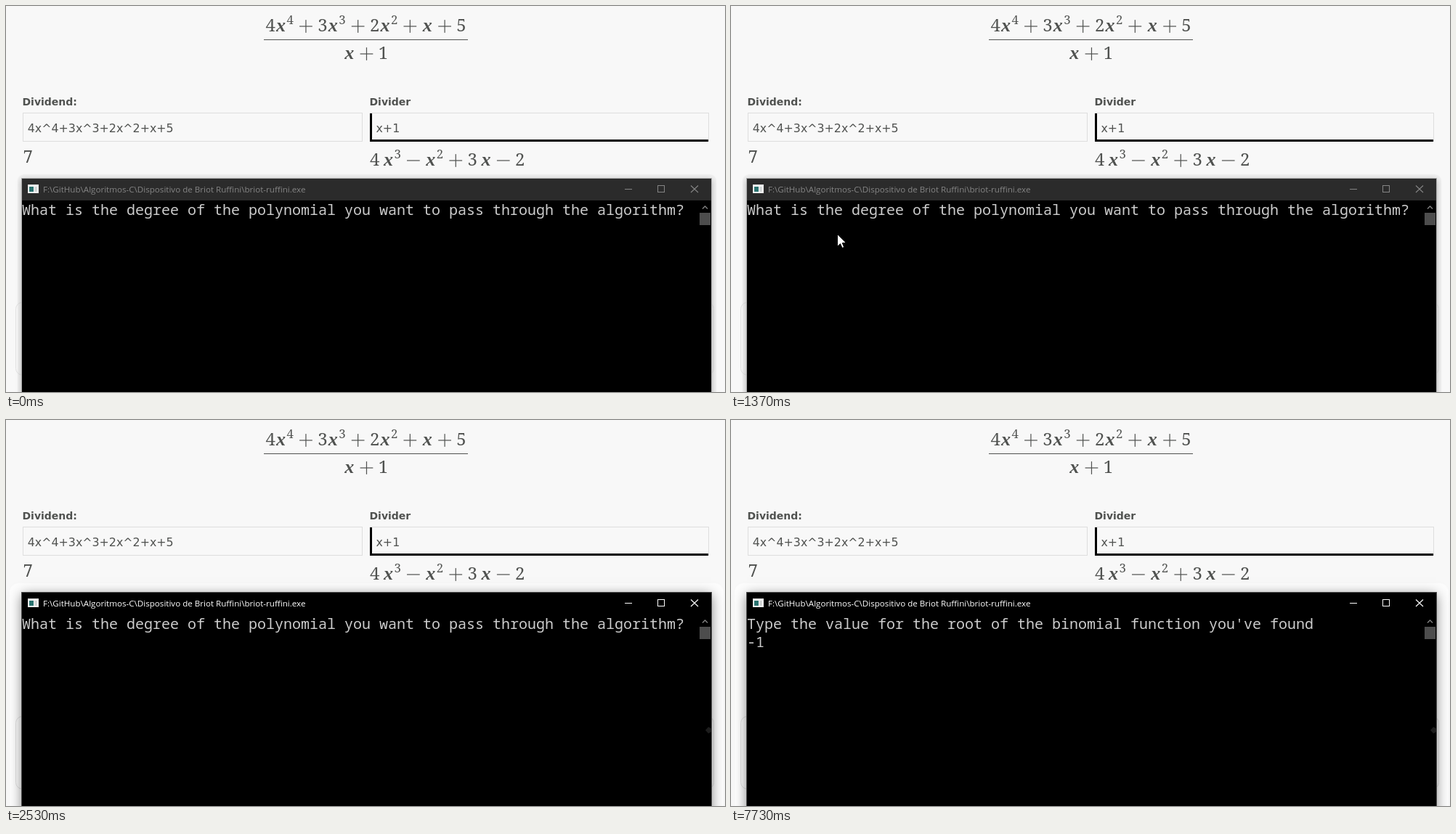
Animation, 990 px wide and 532 px high, one loop 8000 ms. Source, as an HTML page with a canvas:

```html
<!DOCTYPE html>
<html lang="en">
<head>
<meta charset="utf-8">
<title>Polynomial division</title>
<style>
  html, body { margin: 0; width: 100%; height: 100%; overflow: hidden; background: #f8f8f8; }
  canvas { display: block; width: 990px; height: 532px; }
</style>
</head>
<body>
<canvas id="stage" width="990" height="532"></canvas>
<script>
const ctx = document.getElementById('stage').getContext('2d');
const LOOP = 8000;
const INK = '#505250';
const EM = 26.62;
const FOCUS_AT = 1470;
const GONE_AT = 2150;

const ASK_DEGREE = 'What is the degree of the polynomial you want to pass through the algorithm?';
const ASK_ROOT = "Type the value for the root of the binomial function you've found";
const PATH = 'F:\\GitHub\\Algoritmos-C\\Dispositivo de Briot Ruffini\\briot-ruffini.exe';

// start time, prompt, typed text, caret shown
const STATES = [
  [0, ASK_DEGREE, '', false],
  [2020, ASK_DEGREE, '', true],
  [2530, ASK_DEGREE, '', false],
  [3040, ASK_DEGREE, '', true],
  [3560, ASK_DEGREE, '4', true],
  [3590, ASK_DEGREE, '4', false],
  [4080, ASK_DEGREE, '4', true],
  [4180, '', '', false],
  [4210, ASK_ROOT, '', true],
  [5110, ASK_ROOT, '', false],
  [5630, ASK_ROOT, '', true],
  [6140, ASK_ROOT, '', false],
  [6660, ASK_ROOT, '', true],
  [7120, ASK_ROOT, '-', true],
  [7200, ASK_ROOT, '-', false],
  [7400, ASK_ROOT, '-1', true],
  [7730, ASK_ROOT, '-1', false]
];

// time, x, y of the pointer tip
const POINTER = [
  [340, 846, 530], [650, 604, 464], [960, 327, 390], [1140, 222, 356], [1370, 147, 315],
  [1700, 147, 315], [1870, 417, 356], [2150, 976, 422]
];

function rect(x, y, w, h, color) {
  ctx.fillStyle = color;
  ctx.fillRect(x, y, w, h);
}

function text(str, x, y, font, color) {
  ctx.font = font;
  ctx.fillStyle = color;
  ctx.fillText(str, x, y);
}

function line(points, color, width = 1) {
  ctx.beginPath();
  points.forEach(([x, y]) => ctx.lineTo(x, y));
  ctx.strokeStyle = color;
  ctx.lineWidth = width;
  ctx.stroke();
}

function rounded(x, y, w, h, r) {
  ctx.beginPath();
  ctx.roundRect(x, y, w, h, r);
}

// Sets a formula: "^" raises the next digit, "~" is a thin space.
function formula(src, x, base) {
  const digit = (c, x, y, size) => text(c, x, y, size * 0.9 + 'px "Noto Serif", serif', INK);
  for (let i = 0; i < src.length; i++) {
    const c = src[i];
    if (c === '~') {
      x += EM / 6;
    } else if (c === '^') {
      digit(src[++i], x + 0.5, base - 0.36 * EM, 0.7 * EM);
      x += 0.4 * EM;
    } else if (c === '+' || c === '-') {
      const mid = x + 0.611 * EM, axis = Math.round(base - 0.25 * EM), arm = 0.333 * EM;
      rect(mid - arm, axis - 0.6, arm * 2, 1.2, INK);
      if (c === '+') rect(mid - 0.6, axis - arm, 1.2, arm * 2, INK);
      x += 1.2222 * EM;
    } else if (c === 'x') {
      text('x', x + 1.2, base, 'italic bold ' + 0.98 * EM + 'px "Liberation Serif", serif', INK);
      x += 0.5715 * EM;
    } else {
      digit(c, x, base, EM);
      x += 0.5 * EM;
    }
  }
}

function field(x, w, value, focused) {
  ctx.strokeStyle = '#dedede';
  ctx.lineWidth = 1;
  ctx.strokeRect(x + 0.5, 147.5, w - 1, 39);
  if (focused) {
    rect(x, 148, 3, 39, '#000');
    rect(x, 184, w - 1, 3, '#000');
  }
  text(value, x + (focused ? 8.5 : 6.8), 174, '15.84px "DejaVu Sans", sans-serif', INK);
}

function page() {
  rect(0, 0, 990, 532, '#f8f8f8');
  formula('4x^4+3x^3+2x^2+x+5', 357.5, 35);
  rect(355, 46, 281, 1, INK);
  formula('x+1', 465, 73);
  const label = 'bold 14px "DejaVu Sans", sans-serif';
  text('Dividend:', 22.5, 137, label, INK);
  text('Divider', 500.5, 137, label, INK);
  field(23, 468, '4x^4+3x^3+2x^2+x+5', false);
  field(501, 467, 'x+1', true);
  formula('7', 23.5, 216);
  formula('4~x^3-x^2+3~x-2', 501, 220);
}

function shadow(active) {
  if (active) {
    rounded(5, 225, 983, 330, 12);
    ctx.fillStyle = '#fdfdfd';
    ctx.fill();
  } else {
    rounded(16, 232, 962, 330, 9);
    ctx.fillStyle = '#f0f0f0';
    ctx.fill();
  }
  rounded(13.5, 408.5, 961, 100, 9);
  ctx.strokeStyle = '#e2e2e2';
  ctx.lineWidth = 1;
  ctx.stroke();
  ctx.save();
  ctx.shadowColor = active ? 'rgba(0,0,0,.5)' : 'rgba(0,0,0,.32)';
  ctx.shadowBlur = active ? 16 : 8;
  ctx.shadowOffsetY = active ? 3 : 2;
  rect(22, 238, 949, 320, '#000');
  ctx.restore();
}

function titleBar(active) {
  const fg = active ? '#fff' : '#858585';
  ctx.strokeStyle = active ? '#4a4a4a' : '#aaa';
  ctx.lineWidth = 1;
  ctx.strokeRect(21.5, 237.5, 950, 320);
  rect(22, 238, 949, 30, active ? '#000' : '#2b2b2b');

  rect(30, 246, 15, 12, '#e6e6e6');
  rect(31, 248, 13, 9, '#fafafa');
  rect(32, 249, 6, 7, '#2b7370');
  rect(39, 249, 4, 7, '#d5d8d8');

  text(PATH, 51, 257, '11.6px "Open Sans", sans-serif', fg);
  rect(852, 252, 10, 1, fg);
  ctx.strokeStyle = fg;
  ctx.strokeRect(897.5, 247.5, 9, 9);
  line([[943, 247.5], [953, 257]], fg, 1.1);
  line([[953, 247.5], [943, 257]], fg, 1.1);
}

function consoleBody(t) {
  const [, prompt, typed, caret] = STATES.findLast(s => s[0] <= t);
  const mono = '20px "Noto Sans Mono", monospace';
  text(prompt, 22, 288, mono, '#ccc');
  text(typed, 22, 313, mono, '#ccc');
  if (caret) rect(22 + 12 * typed.length, 312, 12, 6, '#fff');
  line([[959, 279.5], [962.5, 276], [966, 279.5]], '#858585', 1.3);
  rect(955, 285, 15, 17, '#4d4d4d');
  if (t >= GONE_AT) {
    ctx.beginPath();
    [[963, 427.5], [967, 423], [971, 425], [971, 430], [967, 432]].forEach(p => ctx.lineTo(...p));
    ctx.fillStyle = '#1d1d1d';
    ctx.fill();
  }
}

function slope(i, k) {
  const a = POINTER[Math.max(i - 1, 0)], b = POINTER[Math.min(i + 1, POINTER.length - 1)];
  const resting = POINTER[i][1] === 147;
  return resting ? 0 : (b[k] - a[k]) / (b[0] - a[0]);
}

// Hermite curve through the pointer keys
function pointerAt(t, k) {
  let i = 0;
  while (i < POINTER.length - 2 && t >= POINTER[i + 1][0]) i++;
  const a = POINTER[i], b = POINTER[i + 1], d = b[0] - a[0], u = (t - a[0]) / d;
  const u2 = u * u, u3 = u2 * u;
  return a[k] * (2 * u3 - 3 * u2 + 1) + b[k] * (3 * u2 - 2 * u3)
    + d * slope(i, k) * (u3 - 2 * u2 + u) + d * slope(i + 1, k) * (u3 - u2);
}

function pointer(t) {
  if (t < 340 || t >= GONE_AT) return;
  ctx.save();
  ctx.translate(Math.round(pointerAt(t, 1)) - 0.5, Math.round(pointerAt(t, 2)) - 0.5);
  ctx.beginPath();
  [[0, 0], [0, 17], [4, 13.2], [6.6, 19], [9.2, 17.9], [6.8, 12.2], [12, 12]]
    .forEach(p => ctx.lineTo(...p));
  ctx.closePath();
  ctx.fillStyle = '#fff';
  ctx.fill();
  ctx.strokeStyle = '#000';
  ctx.lineWidth = 1;
  ctx.stroke();
  ctx.restore();
}

function draw(t) {
  const active = t >= FOCUS_AT;
  page();
  shadow(active);
  titleBar(active);
  consoleBody(t);
  pointer(t);
}

const start = performance.now();
function tick() {
  draw((performance.now() - start) % LOOP);
  requestAnimationFrame(tick);
}
tick();
</script>
</body>
</html>
```
